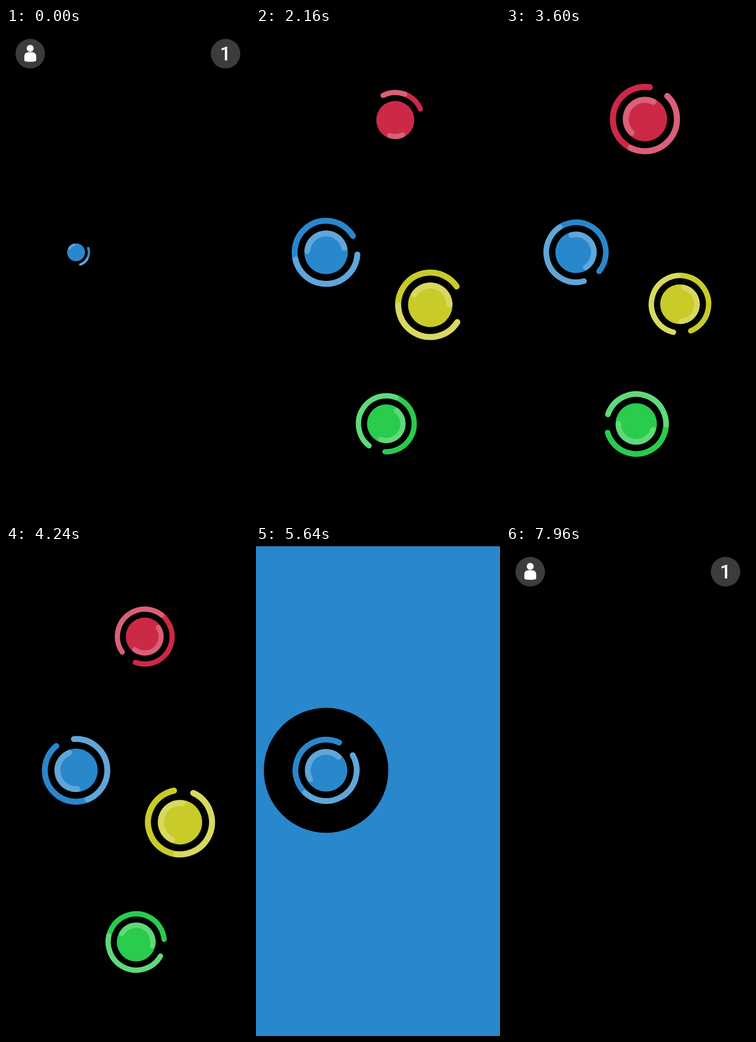
An HTML page that plays this animation: 529x1058 px, repeating every 8000 ms.

```html
<!DOCTYPE html>
<html lang="en">
<head>
<meta charset="utf-8">
<title>Finger chooser</title>
<style>
  html, body { margin: 0; width: 100%; height: 100%; overflow: hidden; background: #000; }
  svg { display: block; width: 100vw; height: 100vh; }
  text { font: 500 42px Roboto, Arial, sans-serif; fill: #fff; text-anchor: middle; }
</style>
</head>
<body>
<svg id="stage" viewBox="0 0 529 1058">
  <g id="reveal">
    <rect y="0.6" width="529" height="1058" fill="#2987cc"/>
    <circle id="hole" cx="151.9" cy="484.3"/>
  </g>
  <g id="touches"></g>
  <g id="buttons">
    <circle cx="52.5" cy="55.5" r="32" fill="#3d3b3d"/>
    <circle cx="52.5" cy="44" r="7.6" fill="#fff"/>
    <path d="M39.7 70V62Q39.7 52.3 49 52.3H56Q65.5 52.3 65.5 62V70Q65.5 73 52.6 73Q39.7 73 39.7 70Z" fill="#fff"/>
    <circle cx="476" cy="55.5" r="32" fill="#3d3b3d"/>
    <text x="475.6" y="70">1</text>
  </g>
</svg>
<script>
const LOOP = 8;
const SPIN = 299;          // degrees per second
const SELECT = 4.35;       // seconds
const RELEASE = 6.5;
const ARC = 103;           // opening arc in degrees
const GLOSS = 'rgba(255,255,255,.26)';

const $ = id => document.getElementById(id);
const clamp = v => Math.max(0, Math.min(1, v));
const lerp = (a, b, u) => a + (b - a) * u;
const progress = (t, start, length) => clamp((t - start) / length);
const easeOut = u => 1 - (1 - u) ** 2;
const easeInOut = u => (1 - Math.cos(Math.PI * u)) / 2;

function add(parent, tag, attrs) {
  const node = document.createElementNS('http://www.w3.org/2000/svg', tag);
  for (const key in attrs) node.setAttribute(key, attrs[key]);
  return parent.appendChild(node);
}

// Drawn at unit radius; each touch group is scaled to its current size.
function arc(parent, radius, color) {
  return add(parent, 'circle', {
    r: radius, fill: 'none', stroke: color, 'stroke-width': 0.172,
    'stroke-linecap': 'round', pathLength: 360
  });
}

function makeTouch(touch) {
  const group = add($('touches'), 'g', {});
  add(group, 'circle', { r: 0.633, fill: touch.color });
  return {
    ...touch, group,
    discGloss: arc(group, 0.547, GLOSS),
    ring: arc(group, 0.914, touch.color),
    ringGloss: arc(group, 0.914, GLOSS)
  };
}

const touches = [
  { color: '#2987cc', birth: -0.039, angle: 78, from: [151.9, 484.3], to: [151.9, 484.3], drift: 1, winner: true },
  { color: '#29cc4c', birth: 0.47, angle: 202, from: [283.9, 852], to: [282.3, 855], drift: 2 },
  { color: '#c9cb28', birth: 0.925, angle: 106.5, from: [378.8, 599.6], to: [377.2, 596.4], drift: 2 },
  { color: '#cc2947', birth: 1.325, angle: 317.5, from: [302.4, 200], to: [300.8, 195.5], drift: 3 }
].map(makeTouch);

function setArc(node, start, span) {
  const first = span < 0 ? start + span : start;
  node.setAttribute('transform', `rotate(${first})`);
  node.setAttribute('stroke-dasharray', `${Math.max(0.01, Math.abs(span))} 720`);
}

function drawTouch(touch, time) {
  // The first touch lands just before the loop restarts.
  const t = time - touch.birth >= LOOP ? time - LOOP : time;
  const age = t - touch.birth;
  const gone = touch.winner ? progress(t, RELEASE, 0.27) : progress(t, SELECT, 0.2);
  const scale = easeOut(progress(age, 0, 0.167)) * (1 - gone);
  touch.group.setAttribute('visibility', age > 0 && scale > 0 ? 'visible' : 'hidden');
  if (age <= 0 || scale <= 0) return;

  const radius = scale * (70.5 + 5.9 * Math.sin(6 * (age + 0.018)));
  const moved = progress(age, 0, touch.drift);
  const [x, y] = touch.from.map((v, i) => lerp(v, touch.to[i], moved));
  touch.group.setAttribute('transform', `translate(${x} ${y}) scale(${radius})`);

  const start = touch.angle + SPIN * t + (t > SELECT ? 6 : 0);
  const opening = lerp(-ARC, ARC, easeInOut(progress(age, 0, 0.38)));
  const span = lerp(opening, 360, easeInOut(progress(age, 0.88, 0.47)));
  setArc(touch.ring, start, span);
  setArc(touch.ringGloss, start, span / 2);
  setArc(touch.discGloss, start + 180, span / 2);
}

function draw(t) {
  touches.forEach(touch => drawTouch(touch, t));

  const closing = easeOut(progress(t, SELECT, 0.38));
  const opening = progress(t, RELEASE, 0.22) ** 2;
  $('hole').setAttribute('r', lerp(lerp(690, 135, closing), 690, opening));
  $('reveal').setAttribute('visibility', t > SELECT && t < RELEASE + 0.22 ? 'visible' : 'hidden');

  const hidden = easeInOut(progress(t, 0, 0.4)) - easeOut(progress(t, 6.72, 0.4));
  $('buttons').setAttribute('transform', `translate(0 ${-92 * hidden})`);
}

const origin = performance.now();
function frame() {
  draw(((performance.now() - origin) / 1000) % LOOP);
  requestAnimationFrame(frame);
}
draw(0);
requestAnimationFrame(frame);
</script>
</body>
</html>
```
